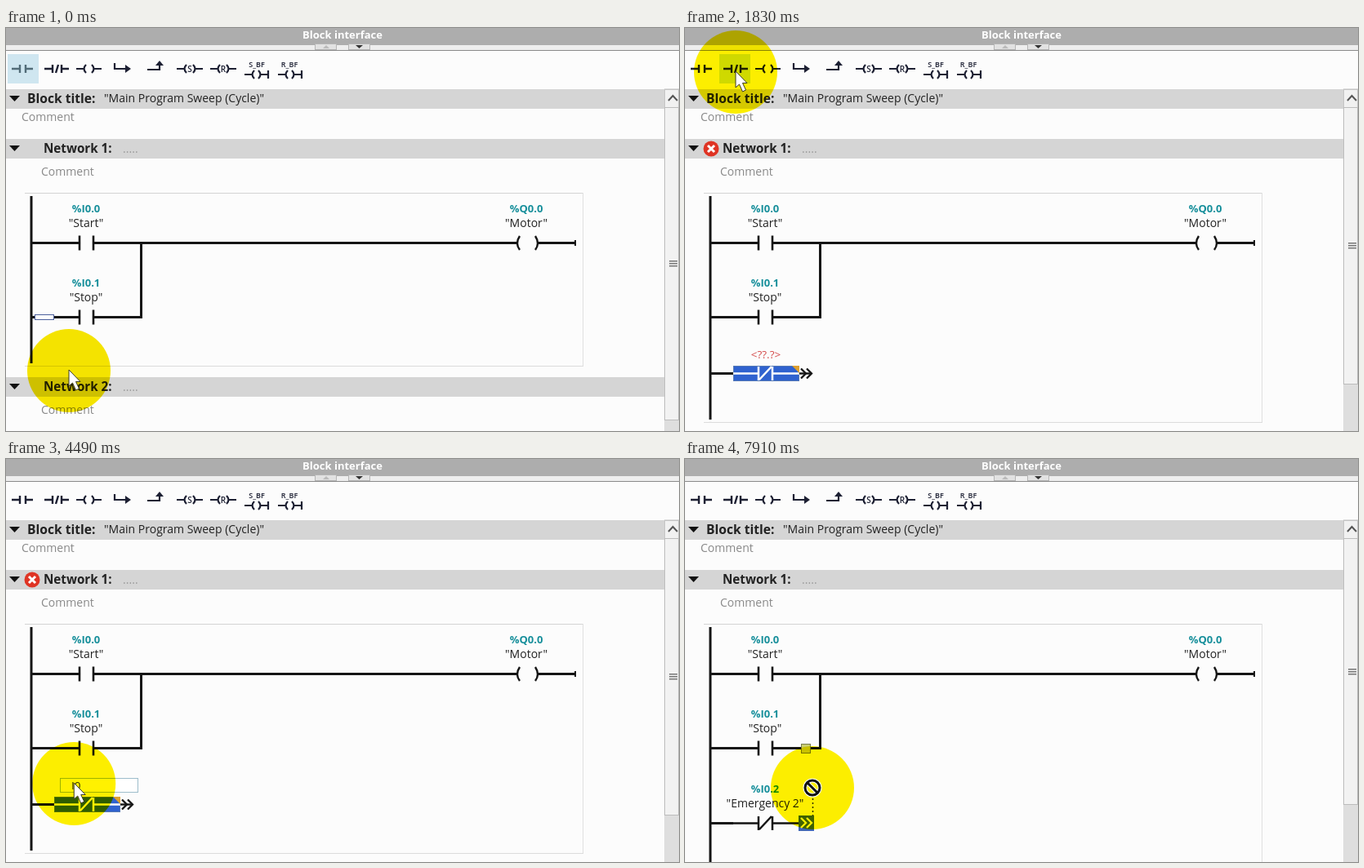
These frames come from a looping animation (824x494 px, 8 s). An HTML page with a canvas:

```html
<!DOCTYPE html>
<html lang="en">
<head>
<meta charset="utf-8">
<title>Ladder editor</title>
<style>
html, body { margin: 0; width: 100%; height: 100%; overflow: hidden; background: #fcfcfc; }
canvas { display: block; }
</style>
</head>
<body>
<canvas id="stage" width="824" height="494"></canvas>
<script>
const ctx = document.getElementById('stage').getContext('2d');
const LOOP = 8000;
const INK = '#151515', NAVY = '#1d2033', BLUE = '#2f62cf', TEAL = '#178f9b';

// Screen refreshes on a 10 ms clock: [first, last, count]
const ticks = [[0, 0, 1], [140, 920, 7], [1050, 1830, 7], [1980, 2100, 2], [2250, 2500, 3],
  [2650, 2650, 1], [2790, 3570, 7], [3700, 4220, 5], [4360, 5010, 6], [5150, 5410, 3],
  [5560, 5940, 4], [6090, 6480, 4], [6620, 7390, 7], [7520, 7910, 4]
].flatMap(([a, b, n]) => Array.from({ length: n },
  (_, i) => Math.floor((a + (n > 1 ? (b - a) * i / (n - 1) : 0)) / 10) * 10));

// Pointer path: [time, x, y]
const path = [[0, 77, 420], [270, 80, 405], [790, 140, 60], [950, 142, 54], [1180, 63, 75],
  [1320, 62, 54], [2100, 62, 54], [2500, 91, 225], [2900, 82, 394], [3310, 80.5, 399.5],
  [3570, 82, 398], [5150, 84, 398], [5690, 89.5, 387], [6300, 90, 387], [6740, 160.5, 353],
  [7000, 156, 380], [7390, 149, 443], [7520, 149, 443], [7910, 156, 403], [8000, 156, 403]];

const at = { branch: 1050, contact: 1830, hover: 3000, edit: 3700, commit: 5280,
  blur: 6480, drag: 7520 };

function pointerAt(t) {
  const i = Math.max(1, path.findIndex(p => p[0] >= t));
  const [t0, x0, y0] = path[i - 1], [t1, x1, y1] = path[i];
  const k = (t - t0) / (t1 - t0), e = k * k * (3 - 2 * k);
  return [x0 + (x1 - x0) * e, y0 + (y1 - y0) * e];
}

function rect(x, y, w, h, fill, stroke) {
  if (fill) { ctx.fillStyle = fill; ctx.fillRect(x, y, w, h); }
  if (stroke) { ctx.strokeStyle = stroke; ctx.lineWidth = 1; ctx.strokeRect(x + .5, y + .5, w - 1, h - 1); }
}
function draw(d, color, width) {
  ctx.strokeStyle = color; ctx.lineWidth = width;
  ctx.stroke(new Path2D(d));
}
function fill(d, color) { ctx.fillStyle = color; ctx.fill(new Path2D(d)); }
function text(s, x, y, size = 14, color = '#222', weight = 400, align = 'left') {
  ctx.font = `${weight} ${size}px "Open Sans", "Noto Sans", sans-serif`;
  ctx.textAlign = align; ctx.fillStyle = color;
  ctx.fillText(s, x, y);
}
const centered = (s, x, y, size, color, weight) => text(s, x, y, size, color, weight, 'center');

function toolbar(t) {
  rect(0, 0, 824, 21, '#adadad');
  centered('Block interface', 412, 13, 13, '#fff', 700);
  rect(0, 21, 824, 6, '#eeeeee');
  for (const x of [378, 419]) rect(x, 19, 27, 8, '#e2e2e2', '#b5b5b5');
  fill('M388 25l4-4 4 4z', '#bbb');
  fill('M428 21h9l-4.500 4z', '#333');
  rect(0, 27, 824, 1, '#8a8a8a');

  const lit = t < 400 ? 2 : t >= 790 && t < 1310 ? 124 : t >= 1310 && t < 2250 ? 42 : -1;
  if (lit >= 0) rect(lit, 32, 38, 36, '#cfe6f0');

  draw('M7 50h10M17 45v10M24 45v10M24 50h9', lit === 2 ? '#526c78' : NAVY, 2.4);
  draw('M47 50h10M57 45v10M61 55l3-10M68 45v10M68 50h9', NAVY, 2.4);
  const coil = (x, y, gap, end = '') => draw(
    `M${x} ${y}h9M${x + 12} ${y - 5}q-5 5 0 10M${x + 10 + gap} ${y - 5}q5 5 0 10M${x + 13 + gap} ${y}h9${end}`, NAVY, 2.2);
  coil(86, 50, 9);
  const branchInk = lit === 124 ? '#5d7b8c' : NAVY;
  draw('M133 43v7h17', branchInk, 2.2);
  fill('M146 45l7 5-7 5z', branchInk);
  draw('M173 51h15v-8', NAVY, 2.2);
  fill('M183 46l5-6 5 6z', NAVY);
  coil(209, 50, 10); centered('S', 225, 54, 10, NAVY, 600);
  coil(250, 50, 10); centered('R', 266, 54, 10, NAVY, 600);
  coil(292, 57, 7, 'M321 52v10'); centered('S_BF', 307, 48, 9, NAVY, 600);
  coil(333, 57, 7, 'M362 52v10'); centered('R_BF', 347, 48, 9, NAVY, 600);
}

function titleBar(y, label, x, size = 15.2) {
  rect(0, y, 806, 24, '#d5d5d5');
  fill(`M4 ${y + 8}h13l-6.500 7z`, '#111');
  text(label, x, y + 17, size, '#222', 700);
}
function network(y, n) {
  titleBar(y, `Network ${n}:`, 46);
  text('.....', 143, y + 17, 14, '#999');
  text('Comment', 43, y + 45, 14, '#898989');
}

function scrollbar(end) {
  rect(806, 74, 18, 420, '#dedede');
  rect(806, 75, 18, 23, '#f1f1f1', '#c4c4c4');
  draw('M811 89l5.500-6 5.500 6', '#555', 2);
  rect(806, 97, 18, end - 97, '#f2f2f2', '#bcbcbc');
  const mid = Math.round((97 + end) / 2);
  for (let y = mid - 4; y <= mid + 4; y += 3) rect(812, y, 10, 1.5, '#777');
}

function contact(y, label, name) {
  draw(`M31 ${y}h59M107 ${y}h59`, INK, 3);
  draw(`M90 ${y - 9}v18M107 ${y - 9}v18`, INK, 2.6);
  centered(label, 98, y - 37.5, 13, TEAL, 700);
  centered(name, 98, y - 19.5);
}

function rungs(bottom) {
  rect(23, 202, 684, 1, '#d4d4d4');
  rect(706, 202, 1, bottom - 202, '#e0e0e0');
  rect(23, bottom, 684, 1, '#dcdcdc');
  draw(`M31 206V${bottom - 3}`, INK, 3);
  contact(263.5, '%I0.0', '"Start"');
  contact(354.5, '%I0.1', '"Stop"');
  draw('M165.500 263.500V356', INK, 3);
  draw('M166 263.500H626M652 263.500h45', INK, 3);
  draw('M629 255q-6 9 0 17M648 255q6 9 0 17', INK, 2.4);
  draw('M697 260v7', INK, 2);
  centered('%Q0.0', 637, 226, 13, TEAL, 700);
  centered('"Motor"', 637, 244);
}

const chevrons = (x, y, color) =>
  draw(`M${x} ${y - 6}l6 6-6 6M${x + 7} ${y - 6}l6 6-6 6`, color, 2.3);

function badge(x, y) {
  rect(x, y - 9, 19, 19, '#3f66b5');
  chevrons(x + 3, y, '#fff');
}

function newContact(t) {
  const done = t >= at.commit, y = done ? 446 : 423;
  const selected = t < at.blur, dragging = t >= at.drag;
  draw(`M31 ${y + .5}h28`, INK, 3);
  if (selected) rect(59, y - 9, 81, 19, BLUE, '#5579b5');
  else if (!dragging) rect(59, y - 9, 80, 18, '#fcfcfc', '#777');
  const ink = selected ? '#fff' : INK;
  draw(`M59 ${y + .5}h31M107 ${y + .5}h33M90 ${y - 8}v17M107 ${y - 8}v17M91 ${y + 8}l15-16`, ink, 2.5);
  if (selected) fill(`M131 ${y - 9}h9v9z`, '#dda02f');
  if (dragging) badge(139, y);
  else { draw(`M140 ${y + .5}h14`, INK, 2.4); chevrons(142, y + .5, INK); }

  if (done) {
    centered('%I0.2', 98, 409, 13, TEAL, 700);
    centered('"Emergency 2"', 98, 427);
  } else if (t >= at.edit) {
    rect(66, 391, 96, 18, '#fff', '#9dbdcb');
    const typed = 'I0.2'.slice(0, Math.max(0, Math.floor((t - 3960) / 200)));
    text(typed || '<??.?>', 80, 405, 13.5, '#333');
  } else {
    const hover = t >= at.hover;
    if (hover) rect(80, 392, 82, 16, '#d7ecf5');
    centered('<??.?>', 99, 405, 13.5, hover ? '#999' : '#d44b4b');
  }
}

function errorMark() {
  ctx.beginPath(); ctx.arc(32, 148, 9.5, 0, 7);
  ctx.fillStyle = '#df3424'; ctx.fill();
  draw('M28 144l8 8M36 144l-8 8', '#fff', 3);
}

function pointer(t) {
  const [x, y] = pointerAt(t);
  const dim = t < 1400 || (t > 2900 && t < 3700);
  ctx.globalCompositeOperation = 'multiply';
  ctx.beginPath(); ctx.arc(x, y, 51, 0, 7);
  ctx.fillStyle = dim ? '#f7e600' : '#fff100';
  ctx.fill();
  ctx.globalCompositeOperation = 'source-over';

  ctx.save();
  ctx.translate(x, y);
  if (t >= at.drag) {
    const ring = 'M9 0a9 9 0 1 1-18 0a9 9 0 1 1 18 0M-6-6L6 6';
    draw(ring, '#fff', 5);
    draw(ring, '#111', 3);
  } else {
    const arrow = 'M0-1V19l4.500-4 4 9 4-2-4-8.500H14z';
    fill(arrow, '#fff');
    draw(arrow, '#3c3c20', 1);
  }
  ctx.restore();
}

function render(t) {
  const bottom = t < at.branch ? 414 : t < at.contact ? 460 : t < at.commit ? 483 : 506;
  const thumbEnd = t < at.branch ? 481 : t < at.contact ? 451 : t < at.commit ? 437 : 424;
  rect(0, 0, 824, 494, '#fcfcfc');
  toolbar(t);
  titleBar(75, 'Block title:', 26, 15.6);
  text('"Main Program Sweep (Cycle)"', 120, 91);
  text('Comment', 19, 114, 14, '#898989');
  network(136, 1);
  rungs(bottom);
  network(bottom + 14, 2);
  if (t < at.branch) {
    rect(35, 351, 24, 7, '#fff', '#4b5f9c');
  } else if (t < at.contact) {
    draw('M31 401h5', INK, 2.6);
    badge(35, 400);
  } else {
    newContact(t);
    if (t < at.commit) errorMark();
  }
  if (t >= at.drag) {
    rect(142, 349, 12, 12, '#c9cd72', '#777b4b');
    ctx.setLineDash([2, 3]);
    draw('M156.500 416v21', '#333', 1.5);
    ctx.setLineDash([]);
  }
  scrollbar(thumbEnd);
  pointer(t);
}

const start = performance.now();
function frame() {
  const t = (performance.now() - start) % LOOP;
  render(ticks.filter(tick => tick <= t + .5).pop());
  requestAnimationFrame(frame);
}
frame();
</script>
</body>
</html>
```
